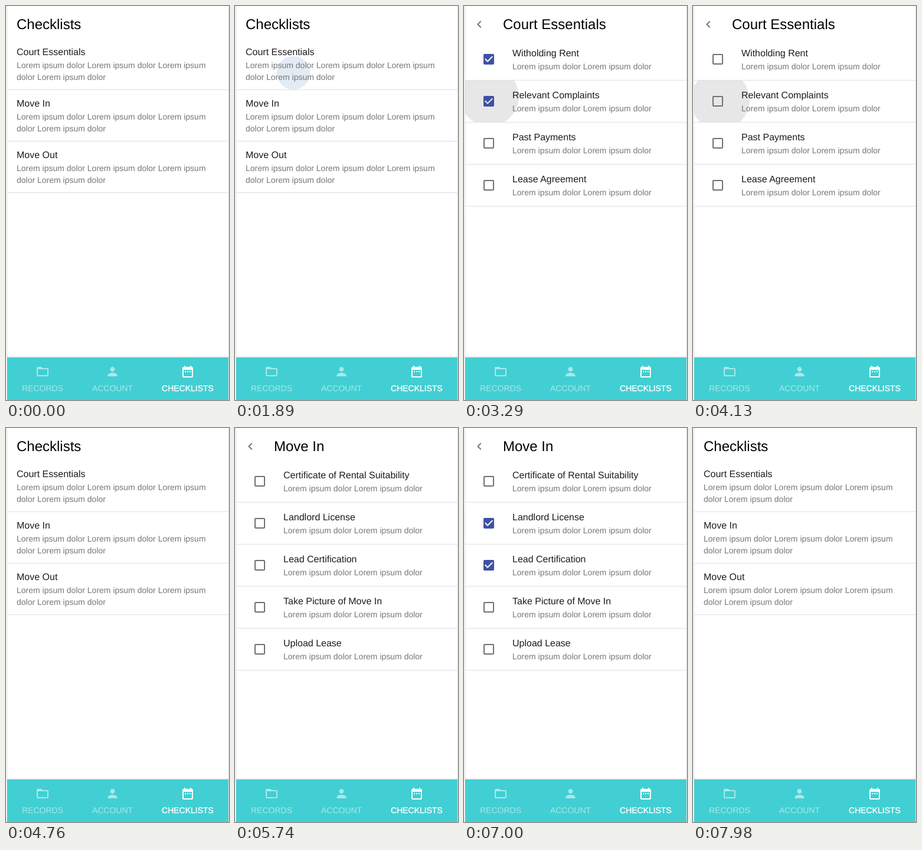
Animation, 378 px wide and 666 px high, one loop 8000 ms. Source, as an HTML page:

```html
<!DOCTYPE html>
<html lang="en">
<head>
<meta charset="utf-8">
<title>Checklists</title>
<style>
  html, body { margin: 0; width: 100%; height: 100%; overflow: hidden; background: #fff; }
  svg { display: block; }
  #stage { width: 100%; height: 100%; }
  text { font-family: "Liberation Sans", Arial, sans-serif; text-rendering: geometricPrecision; }
</style>
</head>
<body>
<svg id="stage" viewBox="0 0 378 666"></svg>
<script>
const LOOP = 8000, STEP = 70;
const stage = document.getElementById('stage');

const ICON = {
  folder: 'M20 6h-8l-2-2H4c-1.1 0-1.99.9-1.99 2L2 18c0 1.1.9 2 2 2h16c1.1 0 2-.9 2-2V8c0-1.1-.9-2-2-2zm0 12H4V8h16v10z',
  person: 'M12 12c2.21 0 4-1.79 4-4s-1.79-4-4-4-4 1.79-4 4 1.79 4 4 4zm0 2c-2.67 0-8 1.34-8 4v2h16v-2c0-2.66-5.33-4-8-4z',
  calendar: 'M9 11H7v2h2v-2zm4 0h-2v2h2v-2zm4 0h-2v2h2v-2zm2-7h-1V2h-2v2H8V2H6v2H5c-1.11 0-1.99.9-1.99 2L3 20c0 1.1.89 2 2 2h14c1.1 0 2-.9 2-2V6c0-1.1-.9-2-2-2zm0 16H5V9h14v11z',
  empty: 'M19 5v14H5V5h14m0-2H5c-1.1 0-2 .9-2 2v14c0 1.1.9 2 2 2h14c1.1 0 2-.9 2-2V5c0-1.1-.9-2-2-2z',
  checked: 'M19 3H5c-1.11 0-2 .9-2 2v14c0 1.1.89 2 2 2h14c1.11 0 2-.9 2-2V5c0-1.1-.89-2-2-2zm-9 14l-5-5 1.41-1.41L10 14.17l7.59-7.59L19 8l-9 9z',
  back: 'M15.41 7.41L14 6l-6 6 6 6 1.41-1.41L10.83 12z'
};

const LIST = { title: 'Checklists', items: ['Court Essentials', 'Move In', 'Move Out'] };
const COURT = { title: 'Court Essentials', items: ['Witholding Rent', 'Relevant Complaints', 'Past Payments', 'Lease Agreement'] };
const MOVE_IN = {
  title: 'Move In',
  items: ['Certificate of Rental Suitability', 'Landlord License', 'Lead Certification', 'Take Picture of Move In', 'Upload Lease']
};

const visits = [
  { at: 0, page: LIST }, { at: 2030, page: COURT }, { at: 4760, page: LIST },
  { at: 5390, page: MOVE_IN }, { at: 7560, page: LIST }
];

// Each tap starts a ripple; on a detail page it also toggles the row.
const taps = [
  { at: 1890, page: LIST, row: 0, x: 99, y: 113 },
  { at: 2240, page: COURT, row: 0, x: 43, y: 88 },
  { at: 3220, page: COURT, row: 1, x: 43, y: 153 },
  { at: 3640, page: COURT, row: 0, x: 44, y: 88 },
  { at: 4060, page: COURT, row: 1, x: 46, y: 159 },
  { at: 5320, page: LIST, row: 1, x: 99, y: 190 },
  { at: 6090, page: MOVE_IN, row: 1, x: 44, y: 158 },
  { at: 6580, page: MOVE_IN, row: 2, x: 44, y: 230 }
];

const text = (x, y, size, fill, str, extra = '') =>
  `<text x="${x}" y="${y}" font-size="${size}" fill="${fill}" ${extra}>${str}</text>`;
const rect = (x, y, w, h, fill) =>
  `<rect x="${x}" y="${y}" width="${w}" height="${h}" fill="${fill}"/>`;
const icon = (name, x, y, fill) =>
  `<path transform="translate(${x} ${y})" d="${ICON[name]}" fill="${fill}"/>`;

function ripple(tap, time, top, height) {
  const age = time - tap.at + STEP;
  if (age < STEP || age >= 420) return '';
  const radius = 120 * (1 - Math.exp(-age / 260));
  const fade = Math.min(1, (420 - age) / 220);
  const [fill, alpha] = tap.page === LIST ? ['#e3ecf5', 1] : ['#000', 0.095];
  return `<svg x="2" y="${top}" width="375" height="${height}" overflow="hidden">
    <circle cx="${tap.x - 2}" cy="${tap.y - top}" r="${radius}" fill="${fill}" opacity="${alpha * fade}"/></svg>`;
}

function listRow(label, i) {
  const y = 87 * i;
  return text(18, 83 + y, 16, '#1c1c1c', label) +
    text(18, 105 + y, 14, '#777', 'Lorem ipsum dolor Lorem ipsum dolor Lorem ipsum') +
    text(18, 125 + y, 14, '#777', 'dolor Lorem ipsum dolor');
}

function detailRow(label, i, checked) {
  const y = 71 * i;
  return icon(checked ? 'checked' : 'empty', 30, 78 + y, checked ? '#3f51a5' : '#707070') +
    text(82, 85 + y, 16, '#1c1c1c', label) +
    text(82, 107 + y, 14, '#777', 'Lorem ipsum dolor Lorem ipsum dolor');
}

function tab(name, label, center, fill, extra = '') {
  return icon(name, center - 12, 606, fill) +
    text(center, 651, 14, fill, label, `text-anchor="middle" ${extra}`);
}

const frame = rect(1, 0, 1, 666, '#dedede') + rect(377, 0, 1, 666, '#dedede') +
  rect(2, 592, 375, 2, '#eee') + rect(2, 594, 375, 72, '#41cfd3') +
  tab('folder', 'RECORDS', 62, '#a9e8e9') +
  tab('person', 'ACCOUNT', 180.5, '#a9e8e9') +
  tab('calendar', 'CHECKLISTS', 308, '#fff', 'stroke="#fff" stroke-width=".35"');

function render(time) {
  const { page } = visits.filter(v => v.at <= time).pop();
  const isList = page === LIST;
  const pitch = isList ? 87 : 71;
  const firstLine = isList ? 141 : 125;
  const pageTaps = taps.filter(t => t.page === page && t.at <= time);

  let out = rect(0, 0, 378, 666, '#fff');
  for (const tap of pageTaps) {
    out += ripple(tap, time, firstLine + 1 + pitch * (tap.row - 1), pitch - 1);
  }
  if (!isList) out += icon('back', 14, 19, '#757575');
  out += text(isList ? 18 : 66, 39, 24, '#000', page.title);
  page.items.forEach((label, i) => {
    const checked = pageTaps.filter(t => t.row === i).length % 2 === 1;
    out += isList ? listRow(label, i) : detailRow(label, i, checked);
    out += rect(2, firstLine + pitch * i, 375, 1, '#e0e0e0');
  });
  stage.innerHTML = out + frame;
}

let shown = -1;
function tick() {
  const time = Math.floor(performance.now() % LOOP / STEP) * STEP;
  if (time !== shown) render(shown = time);
  requestAnimationFrame(tick);
}
tick();
</script>
</body>
</html>
```
